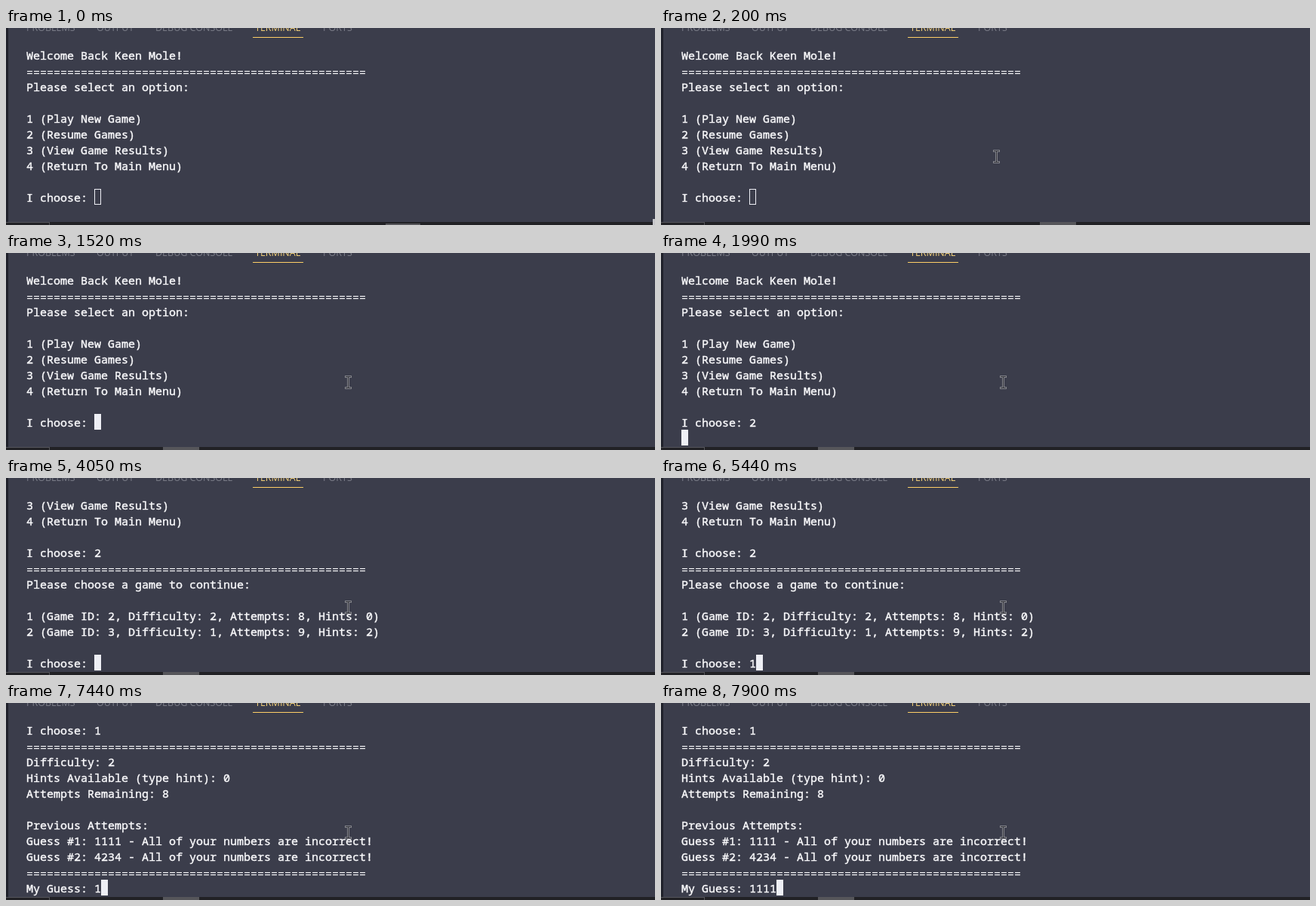
Write an HTML page with a canvas that moves like this. It is 860 by 262 pixels and loops after 8000 ms.

```html
<!DOCTYPE html>
<html lang="en">
<head>
<meta charset="utf-8">
<title>Terminal game</title>
<style>
  html, body { margin: 0; width: 100%; height: 100%; overflow: hidden; background: #3b3d4b; }
  canvas { display: block; }
</style>
</head>
<body>
<canvas id="stage" width="860" height="262"></canvas>
<script>
const ctx = document.getElementById('stage').getContext('2d');
const LOOP = 8000, LEFT = 27, TOP = 25, CELL = 9, ROW = 21;
const RULE = '='.repeat(50);

const log = [
  'Welcome Back Keen Mole!',
  RULE,
  'Please select an option:',
  '',
  '1 (Play New Game)',
  '2 (Resume Games)',
  '3 (View Game Results)',
  '4 (Return To Main Menu)',
  '',
  'I choose: 2',
  RULE,
  'Please choose a game to continue:',
  '',
  '1 (Game ID: 2, Difficulty: 2, Attempts: 8, Hints: 0)',
  '2 (Game ID: 3, Difficulty: 1, Attempts: 9, Hints: 2)',
  '',
  'I choose: 1',
  RULE,
  'Difficulty: 2',
  'Hints Available (type hint): 0',
  'Attempts Remaining: 8',
  '',
  'Previous Attempts:',
  'Guess #1: 1111 - All of your numbers are incorrect!',
  'Guess #2: 4234 - All of your numbers are incorrect!',
  RULE,
  'My Guess: 1111'
];

// [time, first visible line, line being typed, characters shown on it]
const terminalSteps = [
  [0, 0, 9, 10], [1790, 0, 9, 11], [1990, 0, 10, 0],
  [4050, 6, 16, 10], [5440, 6, 16, 11],
  [6110, 16, 26, 10], [7440, 16, 26, 11], [7640, 16, 26, 12], [7770, 16, 26, 13], [7900, 16, 26, 14]
];

// [time, centre x, top y] of the mouse pointer
const mouseSteps = [
  [70, 640.5, 210], [130, 480.5, 172], [200, 444.5, 162],
  [400, 442.5, 162], [470, 448.5, 163], [530, 453.5, 163]
];

const tabs = [['PROBLEMS', 27], ['OUTPUT', 120], ['DEBUG CONSOLE', 198], ['TERMINAL', 330], ['PORTS', 420]];

const stepAt = (steps, t) => steps.filter(step => step[0] <= t).pop();

function rect(color, x, y, w, h) {
  ctx.fillStyle = color;
  ctx.fillRect(x, y, w, h);
}

function drawTabs() {
  ctx.font = '12.5px "Open Sans", sans-serif';
  for (const [label, x] of tabs) {
    ctx.fillStyle = label === 'TERMINAL' ? '#f5d27a' : '#7c7e89';
    ctx.fillText(label, x, 4);
  }
  rect('#ffcf66', 327, 12, 67, 1);
}

function drawTerminal(t, focused) {
  const [, first, last, shown] = stepAt(terminalSteps, t);
  ctx.font = '15px "Noto Sans Mono", monospace';
  ctx.fillStyle = ctx.strokeStyle = '#fbfbfd';
  ctx.lineWidth = .4;
  for (let i = first; i <= last; i++) {
    const text = i === last ? log[i].slice(0, shown) : log[i];
    const baseline = TOP + (i - first) * ROW + 17;
    if (text === RULE) {
      ctx.fillText(text, LEFT, baseline + 1);
    } else {
      ctx.fillText(text, LEFT, baseline);
      ctx.strokeText(text, LEFT, baseline);
    }
  }
  const x = LEFT + shown * CELL, y = TOP + (last - first) * ROW;
  if (focused) {
    rect('#eeeff5', x, y, CELL, ROW);
  } else {
    ctx.strokeStyle = '#eeeff5';
    ctx.lineWidth = 1;
    ctx.strokeRect(x + .5, y + .5, CELL - 1, ROW - 1);
  }
}

function drawTaskbar(t, focused) {
  rect('#212125', 0, 258, 860, 4);
  rect('#55555b', 0, 258, 58, 1);
  rect('#55555b', 57, 258, 1, 4);
  if (focused) rect('#56565a', 208, 258, 48, 4);
  else if (t < 70) rect('#56565a', 503, 260, 46, 2);
  else rect('#56565a', 502, 258, 48, 4);
}

function drawMouse(t) {
  const step = stepAt(mouseSteps, t);
  if (!step) {
    rect('#c6c6ca', 857, 254, 3, 8);
    return;
  }
  const [, x, y] = step;
  const beam = new Path2D(`M${x - 3} ${y + 1.5}h6M${x} ${y + 1.5}v15M${x - 3} ${y + 16.5}h6`);
  ctx.lineCap = 'square';
  for (const [color, width] of [['#85868d', 3], ['#303138', 1]]) {
    ctx.strokeStyle = color;
    ctx.lineWidth = width;
    ctx.stroke(beam);
  }
}

function draw(now) {
  const t = now % LOOP, focused = t >= 1520;
  rect('#3b3d4b', 0, 0, 860, 262);
  rect('#20212b', 0, 0, 3, 262);
  drawTabs();
  drawTerminal(t, focused);
  drawTaskbar(t, focused);
  drawMouse(t);
  requestAnimationFrame(() => draw(performance.now() - start));
}

const start = performance.now();
draw(0);
</script>
</body>
</html>
```
